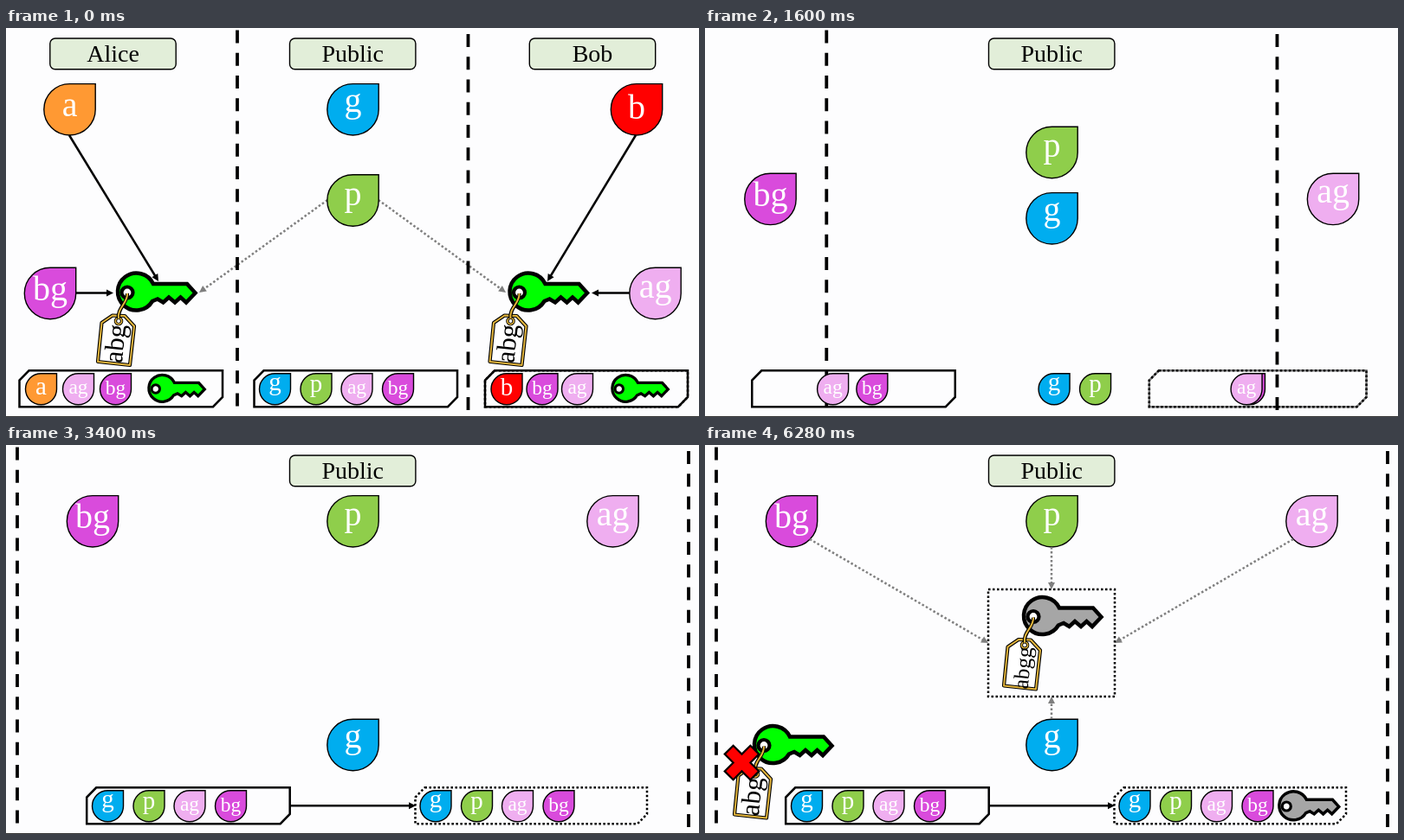
Recreate the animation shown at these times as an HTML page. Size 800x450 px, loop 6320 ms.

```html
<!DOCTYPE html>
<html lang="en">
<head>
<meta charset="utf-8">
<title>Key exchange</title>
<style>
html, body { margin: 0; width: 100%; height: 100%; overflow: hidden; background: #fdfdfe; }
svg { display: block; width: 800px; height: 450px; }
text { font-family: "Liberation Serif", "Noto Serif", serif; text-anchor: middle; }
</style>
</head>
<body>
<svg id="stage" viewBox="0 0 800 450"></svg>
<script>
const LOOP = 6320;
const MORPH = { start: 900, length: 2000 };
const REVEAL = { start: 4230, length: 750 };
const BIG = 29.7, SMALL = 18;

// fill, then font size and baseline offset for big and small drops
const DROPS = {
  a:  { fill: '#ff9933', big: [40, 8],   small: [29, 6] },
  b:  { fill: '#ff0000', big: [40, 11],  small: [29, 7] },
  g:  { fill: '#00adef', big: [40, 3],   small: [29, 1] },
  p:  { fill: '#8fce4b', big: [40, 5],   small: [29, 3] },
  ag: { fill: '#efaef0', big: [40, 4.5], small: [23.5, 5] },
  bg: { fill: '#d94bdc', big: [40, 8],   small: [23.5, 6] }
};

const clamp = v => Math.max(0, Math.min(1, v));
const mix = (from, to, k) => from + (to - from) * k;
const group = (id, content) => `<g id="${id}">${content}</g>`;

function drop(name, x, y, r = BIG) {
  const { fill, big, small } = DROPS[name];
  const [size, dy] = r === BIG ? big : small;
  return `<g transform="translate(${x} ${y})">
    <path d="M0 ${-r}H${r}V0A${r} ${r} 0 1 1 0 ${-r}Z" fill="${fill}" stroke="#000" stroke-width="1.4"/>
    <text y="${dy}" font-size="${size}" fill="#fff">${name}</text></g>`;
}
const smallDrop = (name, x) => drop(name, x, 417.8, SMALL);

const title = (label, x) =>
  `<rect x="${x - 72.7}" y="12" width="145.4" height="35.8" rx="6" fill="#e2eed9" stroke="#000" stroke-width="1.4"/>
   <text x="${x}" y="39" font-size="28">${label}</text>`;

function arrow(x1, y1, x2, y2, dotted) {
  const len = Math.hypot(x2 - x1, y2 - y1);
  const angle = Math.atan2(y2 - y1, x2 - x1) * 180 / Math.PI;
  const color = dotted ? '#7f7f7f' : '#000';
  const dash = dotted ? 'stroke-dasharray="2.5 2.5"' : '';
  return `<g transform="translate(${x1} ${y1}) rotate(${angle})">
    <path d="M0 0H${len - 7}" stroke="${color}" stroke-width="2.5" ${dash}/>
    <path d="M${len} 0l-8 -4v8z" fill="${color}"/></g>`;
}

const key = (x, y, fill, scale = 1) =>
  `<g transform="translate(${x} ${y}) scale(${scale})" stroke="#000">
    <path d="M20 -10H59L68.5 .5L58 11.5L51.5 5.5L45 11.5L38 5.5L31.5 11.5L25 7.5L19 10A21.5 21.5 0 1 1 20 -10Z"
      fill="${fill}" stroke-width="4.5"/>
    <circle cx="-10" r="6.5" fill="#fff" stroke-width="4.2"/></g>`;

function tag(x, y, label, size) {
  const outline = 'M-27 26.5L-13 27L-2 39L-7 84L-44 80L-39.5 35Z';
  const string = 'M-10 1C-9 12 -22 18 -20 30';
  const gold = (d, fill) =>
    `<path d="${d}" fill="${fill}" stroke="#000" stroke-width="4.2"/>
     <path d="${d}" fill="none" stroke="#e3b53c" stroke-width="2"/>`;
  return `<g transform="translate(${x} ${y})" stroke-linejoin="round">
    ${gold(outline, '#fff')}
    <circle cx="-20" cy="33" r="3.6" fill="#fff" stroke="#000" stroke-width="3.4"/>
    <circle cx="-20" cy="33" r="3.6" fill="none" stroke="#e3b53c" stroke-width="1.6"/>
    ${gold(string, 'none')}
    <text transform="translate(-14 60) rotate(-84)" font-size="${size}">${label}</text></g>`;
}
const taggedKey = (x, y, fill, label, size) => key(x, y, fill) + tag(x, y, label, size);

const cross = (x, y) =>
  `<path transform="translate(${x} ${y}) rotate(45)" fill="#f00" stroke="#000" stroke-width="2.2"
    d="M-7 -21H7V-7H21V7H7V21H-7V7H-21V-7H-7Z"/>`;

const trayPath = (x1, x2) => `M${x1 + 11} 396.3H${x2}V427l-11 11.2H${x1}V407.5Z`;
const tray = (id, x1, x2, dash = '') =>
  `<path id="${id}" d="${trayPath(x1, x2)}" fill="none" stroke="#000" stroke-width="2.5" stroke-dasharray="${dash}"/>`;
const divider = (id, y) =>
  `<path id="${id}" d="M0 ${y}V442" stroke="#000" stroke-width="3.8" stroke-dasharray="15 11.25"/>`;

// Drops that travel: name, start x, y, end x, y, radius
const movers = [
  ['g', 400.5, 94.3, 400.5, 347, BIG],
  ['p', 400.5, 199.5, 400.5, 88.3, BIG],
  ['bg', 51, 307, 100, 88.3, BIG],
  ['ag', 749.5, 307, 700.5, 88.3, BIG],
  ...[['ag', 83.5, 212], ['bg', 126.5, 259.5], ['g', 310.5, 496], ['p', 358, 543.5],
    ['bg', 619, 638], ['ag', 659.5, 590.5]]
    .map(([name, from, to]) => [name, from, 417.8, to, 417.8, SMALL])
];

const leaving = title('Alice', 123.5) + title('Bob', 677) +
  drop('a', 73.5, 94.3) + drop('b', 728, 94.3) +
  tray('publicTray', 286.5, 521) +
  smallDrop('a', 40.5) + smallDrop('b', 578) +
  arrow(73, 124, 176, 293) + arrow(81, 306.5, 124, 306.5) +
  arrow(727, 124, 625, 293) + arrow(720, 306.5, 676, 306.5) +
  arrow(371, 199, 223, 306, true) + arrow(430, 199, 577, 306, true) +
  taggedKey(150, 306, '#0f0', 'abg', 31) + taggedKey(602.5, 306, '#0f0', 'abg', 31) +
  key(180, 417.5, '#0f0', .72) + key(715, 417.5, '#0f0', .72);

const arriving = arrow(328, 417.2, 473, 417.2) + smallDrop('g', 117.5) + smallDrop('p', 165);

const revealed =
  arrow(121, 109, 327, 229, true) + arrow(400, 118, 400, 167, true) +
  arrow(679, 109, 473, 229, true) + arrow(400, 317, 400, 291, true) +
  `<rect x="327" y="167" width="146" height="124" fill="none" stroke="#000" stroke-width="2.5" stroke-dasharray="2.5 2.5"/>` +
  taggedKey(389, 198.5, '#a6a6a6', 'abgg', 25) +
  taggedKey(78, 347.5, '#0f0', 'abg', 31) + cross(42.5, 367.5) +
  key(679, 418, '#a6a6a6', .77);

document.getElementById('stage').innerHTML =
  '<rect width="800" height="450" fill="#fdfdfe"/><path d="M0 449.5H800" stroke="#333"/>' +
  title('Public', 400.2) +
  group('leaving', leaving) +
  tray('leftTray', 15.5, 250) + tray('dottedTray', 553, 787, '2.5 2.5') + tray('solidTray', 553, 787) +
  divider('leftDivider', 2.5) + divider('rightDivider', 7) +
  movers.map(([name, , , , , r], i) => group('mover' + i, drop(name, 0, 0, r))).join('') +
  group('leavingTop', smallDrop('ag', 405) + smallDrop('bg', 452.5)) +
  group('arriving', arriving) +
  group('revealed', revealed);

const set = (id, attr, value) => document.getElementById(id).setAttribute(attr, value);
const move = (id, x, y) => set(id, 'transform', `translate(${x} ${y})`);

// Cubic bezier (.238, 0, .365, 1), solved by bisection
function ease(u) {
  if (u <= 0 || u >= 1) return clamp(u);
  let low = 0, high = 1, s = .5;
  for (let i = 0; i < 24; i++) {
    s = (low + high) / 2;
    const x = 3 * (1 - s) * s * (.238 * (1 - s) + .365 * s) + s ** 3;
    if (x < u) low = s; else high = s;
  }
  return s * s * (3 - 2 * s);
}

function render(time) {
  const k = ease((time - MORPH.start) / MORPH.length);
  const out = clamp(1 - k / .4);

  set('leaving', 'opacity', out);
  set('leavingTop', 'opacity', out);
  set('arriving', 'opacity', clamp((k - .6) / .4));
  set('revealed', 'opacity', clamp((time - REVEAL.start) / REVEAL.length));

  move('leftDivider', mix(267, 13, k), 0);
  move('rightDivider', mix(533.5, 788, k), 0);
  move('leftTray', mix(0, 77.7, k), 0);

  const rightTray = trayPath(mix(553, 472.5, k), mix(787, 740, k));
  set('solidTray', 'd', rightTray);
  set('dottedTray', 'd', rightTray);
  set('solidTray', 'opacity', 1 - k);

  movers.forEach(([, x1, y1, x2, y2], i) => move('mover' + i, mix(x1, x2, k), mix(y1, y2, k)));
}

const begin = performance.now();
function tick() {
  render((performance.now() - begin) % LOOP);
  requestAnimationFrame(tick);
}
tick();
</script>
</body>
</html>
```
